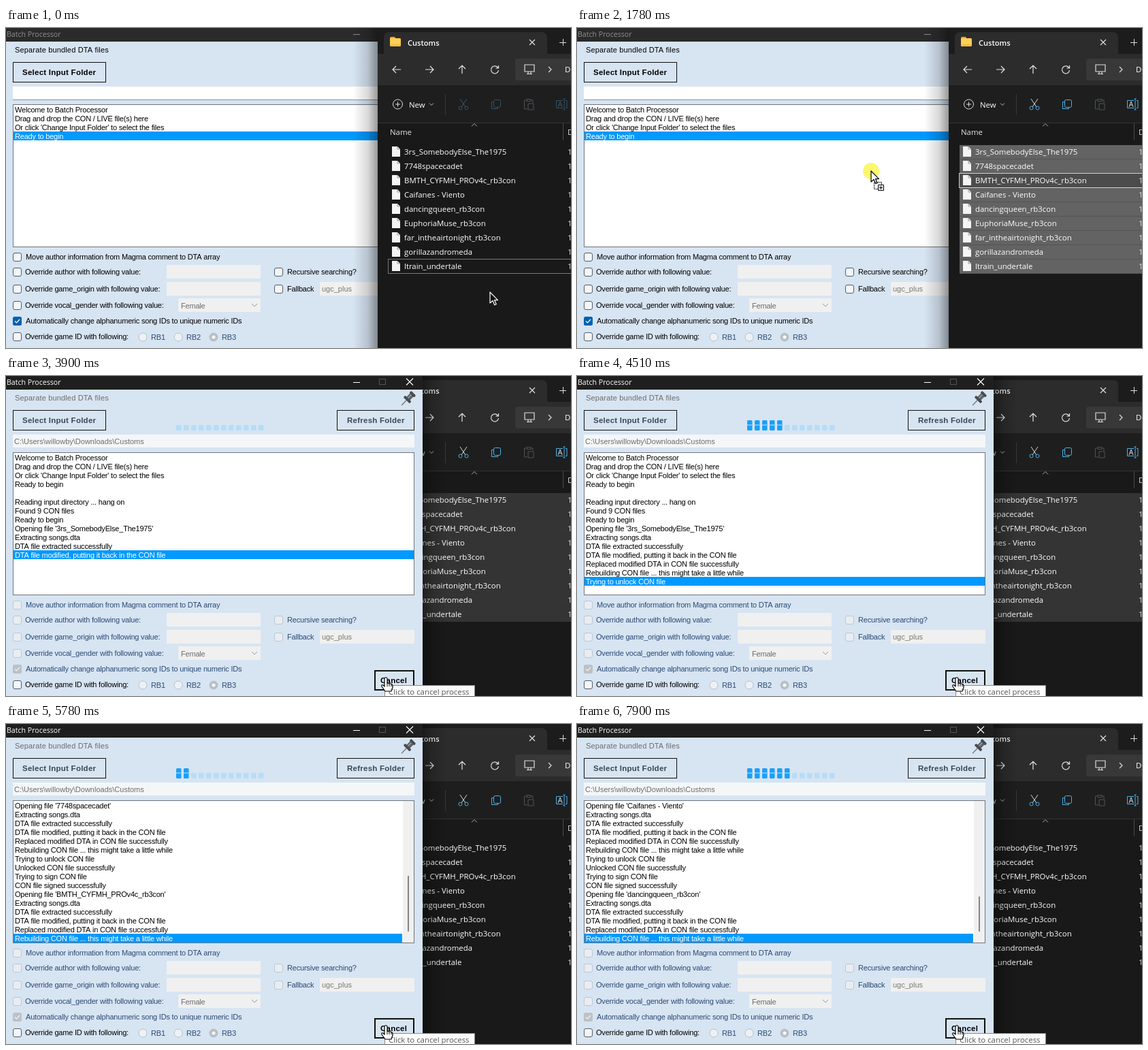
Animation, 830 px wide and 470 px high, one loop 8000 ms. Source, as an HTML page with a canvas:

```html
<!DOCTYPE html>
<html lang="en">
<head>
<meta charset="utf-8">
<title>Batch Processor</title>
<style>
html, body { margin: 0; width: 100%; height: 100%; overflow: hidden; background: #191919; }
canvas { display: block; }
</style>
</head>
<body>
<canvas id="stage" width="830" height="470"></canvas>
<script>
const ctx = document.getElementById('stage').getContext('2d');
const LOOP = 8000;
const FORM = '#d7e4f2', BLUE = '#0099ff', GRAY = '#6d6d6d', NAVY = '#2c4a75';
const SANS = '"Liberation Sans", Arial, sans-serif';
const UI = '"Open Sans", "Noto Sans", sans-serif';

const T = { select: 690, grab: 1480, drop: 2060, scanned: 2500, front: 2810, begin: 3700, refresh: 5060 };

const files = ['3rs_SomebodyElse_The1975', '7748spacecadet', 'BMTH_CYFMH_PROv4c_rb3con',
  'Caifanes - Viento', 'dancingqueen_rb3con', 'EuphoriaMuse_rb3con',
  'far_intheairtonight_rb3con', 'gorillazandromeda', 'ltrain_undertale'];

const log = ['Welcome to Batch Processor', 'Drag and drop the CON / LIVE file(s) here',
  "Or click 'Change Input Folder' to select the files", 'Ready to begin', '',
  'Reading input directory ... hang on', 'Found 9 CON files', 'Ready to begin'];
for (const f of files) {
  log.push(`Opening file '${f}'`, 'Extracting songs.dta', 'DTA file extracted successfully',
    'DTA file modified, putting it back in the CON file', 'Replaced modified DTA in CON file successfully',
    'Rebuilding CON file ... this might take a little while', 'Trying to unlock CON file',
    'Unlocked CON file successfully', 'Trying to sign CON file', 'CON file signed successfully');
}

// [time, number of log lines]
const logSteps = [[0, 4], [T.drop, 6], [T.scanned, 8], [3760, 9], [3830, 11], [3890, 12], [3970, 14],
  [4510, 15], [4580, 17], [4650, 19], [4720, 22], [4780, 24], [4850, 25], [4910, 27], [4990, 29],
  [5060, 32], [5130, 33], [5190, 34], [6240, 35], [6310, 37], [6380, 39], [6450, 42], [6520, 44],
  [7200, 45], [7270, 47], [7340, 49], [7410, 52], [7480, 54]];

// [time, x, y] of the pointer
const route = [[0, 711, 388], [330, 711, 388], [560, 717, 393], [1100, 704, 376], [1170, 704, 376],
  [1480, 640, 224], [1640, 560, 214], [1780, 432, 210], [1920, 259, 216], [1990, 259, 216],
  [2200, 215, 262], [2740, 207, 267], [3070, 207, 267], [3500, 558, 443], [LOOP, 558, 443]];

const presses = [[480, 600], [T.grab, T.drop], [2800, 3080], [3690, 3790]];
const within = (t, [a, b]) => t >= a && t < b;

function rect(x, y, w, h, fill) {
  ctx.fillStyle = fill;
  ctx.fillRect(x, y, w, h);
}
function frame(x, y, w, h, color, line = 1) {
  ctx.strokeStyle = color;
  ctx.lineWidth = line;
  ctx.strokeRect(x + line / 2, y + line / 2, w - line, h - line);
}
function round(x, y, w, h, r, fill, stroke) {
  ctx.beginPath();
  ctx.roundRect(x, y, w, h, r);
  paint(fill, stroke);
}
function circle(x, y, r, fill, stroke) {
  ctx.beginPath();
  ctx.arc(x, y, r, 0, Math.PI * 2);
  paint(fill, stroke);
}
function paint(fill, stroke, width = 1) {
  if (fill) { ctx.fillStyle = fill; ctx.fill(); }
  if (stroke) { ctx.strokeStyle = stroke; ctx.lineWidth = width; ctx.stroke(); }
}
function lines(x, y, d, color, width = 1) {
  ctx.save();
  ctx.translate(x, y);
  ctx.strokeStyle = color;
  ctx.lineWidth = width;
  ctx.stroke(new Path2D(d));
  ctx.restore();
}
function text(s, x, y, color, font = '11px ' + SANS, gap = 0) {
  ctx.font = font;
  ctx.letterSpacing = gap + 'px';
  ctx.fillStyle = color;
  ctx.fillText(s, x, y);
}
const label = (s, x, y, color = '#000') => text(s, x, y, color, undefined, -0.2);
const ui = (s, x, y, color = '#fff', size = 11.4, weight = 400) => text(s, x, y, color, `${weight} ${size}px ${UI}`);

// Window shadow falling from an edge at x, reaching w pixels (negative: to the left)
function shadow(x, w) {
  const g = ctx.createLinearGradient(x, 0, x + w, 0);
  g.addColorStop(0, 'rgba(0,0,0,.4)');
  g.addColorStop(0.4, 'rgba(0,0,0,.15)');
  g.addColorStop(1, 'rgba(0,0,0,0)');
  rect(Math.min(x, x + w), 0, Math.abs(w), 470, g);
}

function drawExplorer(t, front) {
  const selected = t >= T.select && t < T.refresh;
  const tool = t >= T.select ? '#d8d8d8' : '#4b535b';
  const accent = t >= T.select ? '#4cb4ee' : '#31526b';
  rect(546, 0, 284, 470, '#191919');
  rect(546, 0, 284, 38, '#1c1c1c');
  round(555, 6, 240, 40, 7, '#2c2c2c');
  rect(546, 38, 284, 46, '#2c2c2c');
  rect(546, 84, 284, 55, '#1e1e1e');
  rect(546, 139, 284, 1, '#333');

  round(564, 13, 8, 6, 1.5, '#e8a92c');
  round(564, 15, 16, 12, 1.5, '#ffcf55');
  rect(565, 24, 14, 2, '#f3b83c');
  ui('Customs', 590, 26, '#fff', 11.1, 600);
  lines(773, 21, 'M-4-4L4 4M4-4L-4 4', '#ddd', 1.2);
  lines(818, 21, 'M-5 .5H5M.5-5V5', '#ddd');

  lines(574, 61, 'M6 0H-6M-1-5L-6 0L-1 5', '#e4e4e4', 1.2);
  lines(622, 61, 'M-6 0H6M1-5L6 0L1 5', '#e4e4e4', 1.2);
  lines(670, 61, 'M0 6V-6M-5-1L0-6L5-1', '#e4e4e4', 1.2);
  lines(718, 61, 'M5-2A5.5 5.5 0 1 0 5.5 1M5.5-6V-2H1.5', '#e4e4e4', 1.2);
  round(748, 45, 100, 32, 4, '#383838');
  lines(769, 61, 'M-7-7H7V3H-7ZM-2 3V6M2 3V6M-4 6.5H4', '#ddd', 1.2);
  lines(799, 61, 'M-2-4L2 0L-2 4', '#ddd', 1.2);
  ui('D', 821, 65);

  circle(575.5, 112, 7, null, '#ddd');
  lines(575.5, 112, 'M-3.5 0H3.5M0-3.5V3.5', '#ddd');
  ui('New', 592, 117);
  lines(625, 112, 'M-3-1.5L0 1.5L3-1.5', '#bbb');
  rect(645, 97, 1, 31, '#383838');
  lines(672, 112, 'M-5-8L3 4M5-8L-3 4', tool);
  circle(667.5, 117.5, 2.5, null, accent);
  circle(676.5, 117.5, 2.5, null, accent);
  lines(720, 112, 'M-3-3.5H-6.5V6.5H2.5V4', accent);
  round(716.5, 105.5, 10, 11, 2, null, accent);
  lines(768, 112, 'M-3-6H-6.5V7H-2M3-6H6V-2M-3-7.5H3V-4.5H-3ZM-1-1H7V8H-1Z', '#4b535b');
  lines(816, 112, 'M2-5.5H-7.5V5.5H2M6-5.5H8V5.5H6M4-8V8M2.5-8H5.5M2.5 8H5.5', accent);
  lines(816, 112, 'M-5 4L-2-4L1 4M-4 1H0', tool);

  lines(688, 142, 'M-4 2.5L0-1.5L4 2.5', '#aaa');
  ui('Name', 564, 157, '#e6e6e6');
  rect(818, 140, 1, 25, '#4a4a4a');
  ui('D', 825, 157, '#ddd');

  const focus = t < T.grab ? 8 : 2;
  files.forEach((name, i) => {
    const y = 172 + 21 * i;
    const focused = !front && i === focus;
    if (selected) {
      rect(562, y, 268, 21, front ? '#333' : '#555');
      rect(562, y, 268, 20, front ? '#343434' : focused ? '#4c4c4c' : '#636363');
    }
    if (focused) frame(561, y - 1, 280, 22, selected ? '#d0d0d0' : '#777');
    ctx.beginPath();
    ctx.moveTo(567, y + 2);
    ctx.lineTo(575, y + 2);
    ctx.lineTo(579, y + 6);
    ctx.lineTo(579, y + 17);
    ctx.lineTo(567, y + 17);
    ctx.closePath();
    paint('#f4f4f4');
    lines(575, y + 2, 'M0 0V4H4', '#999');
    ui(name, 585, y + 14);
    ui('1', 825, y + 14, '#ddd');
  });
}

function checkbox(x, cy, off, checked) {
  const y = cy - 6;
  if (checked) {
    round(x, y, 13, 13, 2.5, off ? '#bcc1c6' : '#0062b1');
    lines(x + 6.5, cy + 0.5, 'M-3.5 0L-1 2.5L3.5-2.5', off ? '#f4f4f4' : '#fff', 1.2);
  } else {
    round(x + 0.5, y + 0.5, 12, 12, 2.5, off ? '#e9edf1' : '#f3f6f9', off ? '#bec7cf' : '#555b61');
  }
}
function radio(x, name, on) {
  circle(x, 454, 6, on ? '#b9bec3' : '#edf1f5', '#b8c0c8');
  if (on) circle(x, 454, 2.6, '#f6f8fa');
  label(name, x + 12, 458, NAVY);
}
function button(s, x, y, w, h, tx, off, line = 1) {
  rect(x, y, w, h, FORM);
  frame(x, y, w, h, '#111', line);
  text(s, tx, y + h / 2 + 4, off ? '#3c4650' : '#000', 'bold 11.5px ' + SANS, 0.25);
}
const field = (x, y, w) => rect(x, y, w, 20, '#f0f0f0');

function drawProgress(t) {
  if (t < 3820) return;
  const lit = Math.max(0, Math.floor((t - 3880) / 125)) % 13;
  for (let i = 0; i < 12; i++) {
    const x = 250 + 11 * i;
    if (i < lit) {
      round(x, 65, 7.5, 15, 1.5, '#1aa0fa');
      rect(x, 71, 7.5, 2, '#72c4f6');
    } else {
      round(x, 72, 7.5, 8, 1, '#b5ddf8');
    }
  }
}

function drawLog(t, hover) {
  let n = 0;
  for (const [at, count] of logSteps) if (t >= at) n = count;
  const overflow = n > 16;
  const first = Math.max(0, n - 16);
  rect(10, 112, 590, 210, '#fff');
  const right = overflow ? 582 : 599;
  for (let i = first; i < n; i++) {
    const y = 113 + 13 * (i - first);
    const last = i === n - 1;
    if (last) rect(11, y, right - 11, 13, BLUE);
    label(log[i], 13, y + 11, last ? '#fff' : '#000');
  }
  if (overflow) {
    const len = 175 * 16 / n;
    rect(583, 113, 16, 208, '#f0f0f0');
    round(590, 305 - len, 2, len, 1, '#858585');
  }
  frame(10, 112, 590, 210, hover ? '#0078d4' : '#6f757b');
}

function drawPin() {
  ctx.save();
  ctx.translate(591, 33);
  ctx.rotate(Math.PI / 4);
  lines(0, 4, 'M0 0V10', '#777', 1.4);
  round(-3.5, -8, 7, 9, 1, '#5d6267');
  round(-5, -11, 10, 4, 1.5, '#484c50');
  round(-6.5, 0, 13, 4, 1.5, '#484c50');
  rect(-1.5, -7, 1.5, 7, '#9ba0a5');
  ctx.restore();
}

function drawApp(t, front) {
  const running = t >= T.begin;
  const loaded = t >= T.scanned;
  const off = running || within(t, [T.drop, T.scanned]);
  const ink = off ? NAVY : '#000';
  ctx.save();
  ctx.beginPath();
  ctx.roundRect(-10, -10, 622, 480, [0, 0, 6, 0]);
  ctx.clip();
  rect(0, 0, 612, 470, FORM);
  rect(0, 0, 612, 20, front ? '#1f1f1f' : '#2b2b2b');
  const caption = front ? '#fff' : '#8f8f8f';
  ui('Batch Processor', 1, 13, caption, 10.6);
  rect(510, 9, 10, 1, caption);
  frame(548, 4, 10, 9, '#555');
  lines(593, 8.5, 'M-5-5L5 5M5-5L-5 5', caption, 1.1);

  text('Separate bundled DTA files', 13, 36, running ? GRAY : '#000', undefined, 0.16);
  drawPin();
  button('Select Input Folder', 10, 50, 137, 30, 24, off);
  if (loaded) button('Refresh Folder', 486, 50, 114, 30, 501, off);
  drawProgress(t);

  rect(10, 86, 590, 20, off ? '#f4f6f8' : '#fff');
  if (t >= T.drop) text('C:\\Users\\willowby\\Downloads\\Customs', 12, 100, off ? GRAY : '#000');
  if (loaded && !off) rect(10, 104, 590, 2, '#0067c0');
  else rect(10, 105, 590, 1, off ? '#dbe2e9' : '#8c9299');
  drawLog(t, front && t < 3350);

  const options = [[336, 'Move author information from Magma comment to DTA array', 29],
    [358, 'Override author with following value:', 28],
    [383, 'Override game_origin with following value:', 28],
    [407, 'Override vocal_gender with following value:', 28],
    [430, 'Automatically change alphanumeric song IDs to unique numeric IDs', 29]];
  for (const [y, s, x] of options) {
    checkbox(10, y, off, y === 430);
    label(s, x, y + 4, ink);
  }
  checkbox(10, 453, false);
  label('Override game ID with following:', 28, 457);
  checkbox(394, 358, off);
  label('Recursive searching?', 413, 362, ink);
  checkbox(394, 383, off);
  label('Fallback', 413, 387, ink);

  field(236, 348, 138);
  field(236, 373, 138);
  field(253, 397, 121);
  label('Female', 257, 412, GRAY);
  lines(365, 407, 'M-4-2L0 2L4-2', '#999');
  field(461, 373, 139);
  text('ugc_plus', 464, 387, '#787b70');
  radio(201, 'RB1');
  radio(253, 'RB2');
  radio(305, 'RB3', true);

  if (running) button('Cancel', 541, 432, 59, 30, 550, false, 2);
  else if (loaded) button('Begin', 541, 432, 59, 30, 554, false);
  ctx.restore();
}

function drawTooltip() {
  rect(556, 454, 133, 20, '#fbfbfb');
  frame(556, 454, 133, 20, '#8a8a8a');
  ui('Click to cancel process', 562, 468, '#575757');
}

function pointerAt(t) {
  const i = Math.max(1, route.findIndex(p => p[0] > t));
  const [t0, x0, y0] = route[i - 1], [t1, x1, y1] = route[i];
  const k = (t - t0) / (t1 - t0);
  return [x0 + (x1 - x0) * k, y0 + (y1 - y0) * k];
}

const arrow = new Path2D('M0 0V16L4 12.5L6.7 18.8L9.2 17.8L6.5 11.6H11.5Z');
const hand = new Path2D('M-2 1Q0-1.5 2 1V8L8.5 9.5Q10.5 10.5 10 14L8 20H-1L-6 13Q-7 10-4 11L-2 13Z');

function drawPointer(t) {
  const [x, y] = pointerAt(t);
  const pressed = presses.some(p => within(t, p));
  const dragging = within(t, [T.grab, T.drop]);
  if (pressed) circle(x, y, 12, 'rgba(252,244,60,.75)');
  ctx.save();
  ctx.translate(Math.round(x), Math.round(y));
  ctx.lineJoin = 'round';
  const shape = x > 541 && t > T.front ? hand : arrow;
  let fill = '#fff', edge = '#000';
  if (shape === arrow && !dragging) {
    if (t < T.grab) [fill, edge] = ['#111', '#fff'];
    else [fill, edge] = ['#452414', '#22140c'];
  }
  ctx.fillStyle = fill;
  ctx.strokeStyle = edge;
  ctx.lineWidth = 1.2;
  ctx.fill(shape);
  ctx.stroke(shape);
  if (shape === hand) lines(0, 0, 'M2 8V13M5 9V13M8 10V13', '#000');
  if (dragging) {
    ctx.setLineDash([2, 1]);
    lines(0, 0, 'M4.5 16.5H15.5V26.5H4.5Z', '#000');
    ctx.setLineDash([]);
    rect(10, 20, 9, 9, '#fff');
    frame(10, 20, 9, 9, '#000');
    lines(14.5, 24.5, 'M-2.5 0H2.5M0-2.5V2.5', '#000');
  }
  ctx.restore();
}

function draw(now) {
  const t = now % LOOP;
  const front = t >= T.front;
  if (front) {
    drawExplorer(t, front);
    shadow(612, 36);
    drawApp(t, front);
  } else {
    drawApp(t, front);
    shadow(546, -36);
    drawExplorer(t, front);
  }
  if (t >= 3830) drawTooltip();
  drawPointer(t);
}

let start;
function tick(now) {
  start ??= now;
  draw(Math.max(0, now - start));
  requestAnimationFrame(tick);
}
draw(0);
requestAnimationFrame(tick);
</script>
</body>
</html>
```
